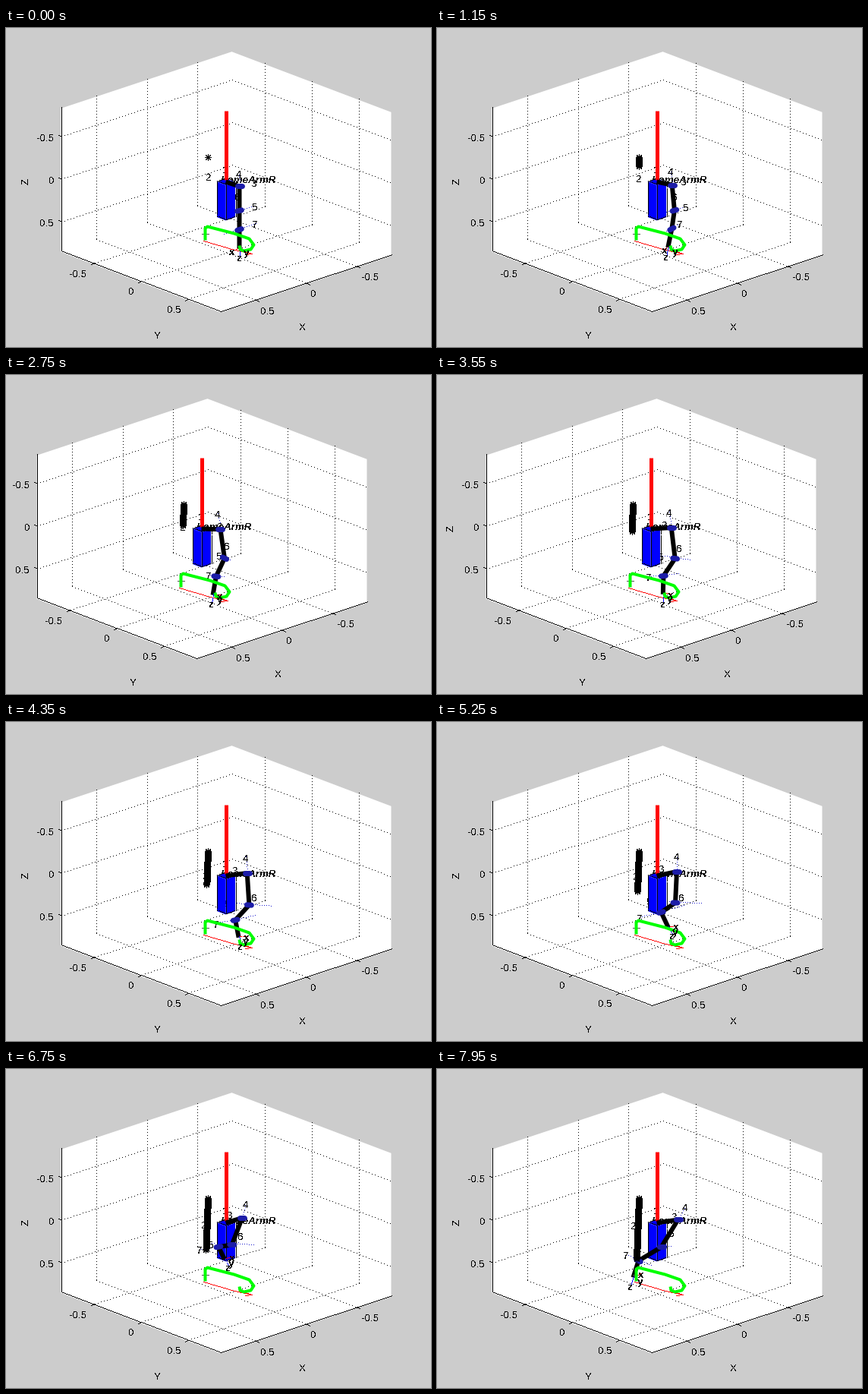
A matplotlib script that plays this animation: 560x420 px, repeating every 8 s.

```python
import numpy as np
import matplotlib.pyplot as plt
from matplotlib.animation import FuncAnimation

W, H, DPI = 560, 420, 100
PX = 72 / DPI  # points per pixel
FRAMES, INTERVAL = 160, 50
LAST_STEP = FRAMES // 2

plt.rcParams.update({
    "font.family": "Liberation Sans", "font.size": 13.33 * PX,
    "text.antialiased": False,
})

fig = plt.figure(figsize=(W / DPI, H / DPI), dpi=DPI, facecolor="#cccccc")
ax = fig.add_axes([0, 0, 1, 1])
ax.axis("off")
ax.set_ylim(H - 0.5, -0.5)

R = 0.842  # half the axis range
BASIS = np.array([[-112.5, 37.3], [105, 39.8], [0, 94.5]]) / R
ORIGIN = np.array([289.5, 202.3])


def project(*points):
    return ORIGIN + np.array(points) @ BASIS


def raster(points, gap=1):
    """Whole-pixel positions along a polyline, one in every `gap`."""
    points = np.asarray(points, float)
    parts = []
    for a, b in zip(points, points[1:]):
        count = int(np.abs(b - a).max()) + 1
        parts.append(np.linspace(a, b, count)[::gap])
    return np.floor(np.concatenate(parts) + 0.5).T


def thin(points, color="k", z=2, gap=1):
    x, y = raster(points, gap)
    return ax.plot(x, y, ",", color=color, zorder=z)[0]


def thick(points, color, width, z, cap="butt"):
    x, y = np.array(points, float).T
    return ax.plot(x, y, color=color, lw=width * PX, zorder=z,
                   solid_capstyle=cap, solid_joinstyle="round")[0]


def label(x, y, text, ha="center", z=3, **kw):
    """Place text with the middle of its capitals at y."""
    return ax.text(x, y + 4.8, text, ha=ha, va="baseline", zorder=z, **kw)


def face(points, color, z=1):
    ax.add_patch(plt.Polygon(points, closed=True, fc=color, ec="none",
                             zorder=z))


def draw_axes():
    face(project((-R, -R, -R), (R, -R, -R), (R, -R, R), (R, R, R),
                 (-R, R, R), (-R, R, -R)), "white")
    for t in (-0.5, 0, 0.5):
        thin(project((t, -R, -R), (t, -R, R), (t, R, R)), gap=4)
        thin(project((-R, t, -R), (-R, t, R), (R, t, R)), gap=4)
        thin(project((R, -R, t), (-R, -R, t), (-R, R, t)), gap=4)

        name = f"{t:g}"
        tx, ty, tz = project((t, R, R), (R, t, R), (R, -R, t))
        thin([tx, tx + (4, 2)])
        thin([ty, ty + (-4, 2)])
        thin([tz, tz + (-4, -2)])
        label(63, tz[1], name, "right")
        label(tx[0] + 7, tx[1] + 12.5, name, "left")
        label(ty[0] - 9, ty[1] + 12, name, "right")
    thin(project((R, -R, -R), (R, -R, R), (R, R, R), (-R, R, R)))
    label(390, 393, "X")
    label(199, 404, "Y")
    ax.text(26, 201, "Z", rotation=90, ha="center", va="center")


def draw_body():
    a, h = 0.0465, 0.413
    left, front, right, back = (a, -a), (a, a), (-a, a), (-a, -a)
    top = project(*[(*c, 0) for c in (left, front, right, back, left)])
    face(top, "#0000ff", z=5)
    thin(top, z=5)
    for c, d in ((left, front), (front, right)):
        side = project((*c, 0), (*d, 0), (*d, h), (*c, h), (*c, 0))
        face(side, "#0000ff", z=5)
        thin(side, z=5.1)
    thick([(289, 108.5), (289, 200)], "red", 5, 6)
    label(282, 199, "HomeArmR", "left", 4, weight="bold", style="italic")
    label(288, 186, "1")


def draw_path():
    thick([(262, 279), (262, 263), (265, 261), (300, 270), (320, 277),
           (326, 285), (322, 291), (313, 293), (308, 291), (307, 286)],
          "#00ff00", 4, 10)
    thin([(257, 272), (266, 272)], "#555555", 9)
    thin([(259, 281), (300, 293), (323, 298), (314, 299)], "red", 9)
    thin([(308, 293), (323, 298)], "red", 9)


def travel(u, start, end, swing=(0, 0), lift=(0, 0), arc=(0, 0)):
    """Straight drift from start to end with three smooth bends."""
    start, end, swing, lift, arc = map(np.array, (start, end, swing, lift, arc))
    return (start + (end - start) * u + swing * np.sin(2 * np.pi * u * u)
            + lift * np.sin(np.pi * u * u) + arc * np.sin(np.pi * u))


def arm_joints(u):
    return (
        travel(u, (307, 208), (317, 198), swing=(5, 0), lift=(0, -5)),
        travel(u, (307, 240), (295, 234), swing=(6, 4), arc=(14, 0)),
        travel(u, (307, 265), (265, 252), swing=(0, 12), lift=(0, -11),
               arc=(18, 0)),
        travel(u, (307, 290), (258, 274), swing=(0, 15), lift=(26, -15),
               arc=(5, 0)),
    )


def number_spots(u, shoulder, elbow, wrist):
    """Joint numbers sit at the ends of slowly turning joint axes."""
    arc, lift = np.sin(np.pi * u), np.sin(np.pi * u * u)
    turn = np.cos(4.5 * u)
    return {
        "2": np.array((267 - 8 * u, 196 + 10 * u)),
        "3": shoulder + (20 * turn, -4),
        "4": shoulder + (10 * u - 1 - 7 * arc, -16 - 4 * arc),
        "5": elbow + (27.5 * turn - 6.5, 5 * u - 5),
        "6": elbow + (16 * u - 2, 12 * lift ** 2 - 18),
        "7": wrist + (25 * np.cos(4.2 * u ** 0.8) - 4, 15 * lift - 7),
    }


def unit(v):
    return v / np.hypot(*v)


draw_axes()
draw_body()
draw_path()

blank = [(0, 0), (0, 0)]
arm = thick(blank, "k", 6, 7)
joints = [thick(blank, "#1c1ca8", 7, 8, "round") for _ in range(3)]
pivots = [thin(blank, "#2020d0", 3) for _ in range(3)]
tool_x = thin(blank, "red", 9)
tool_z = thin(blank, "blue", 9)
trail = ax.plot([], [], "k", ls="none", marker=(8, 2, 0), ms=9 * PX,
                mew=PX, zorder=8)[0]
numbers = {n: label(0, 0, n) for n in "234567"}
tool_names = {n: label(0, 0, n, z=11, weight="bold") for n in "xyz"}


def place(texts, spots):
    for name, (x, y) in spots.items():
        texts[name].set_position((x, y + 4.8))


def update(frame):
    step = (frame + 1) // 2
    u = step / LAST_STEP

    # The view jumps left once, then glides back
    shift = min(0, 3 * (step - 28) - 32) if step >= 28 else 0
    ax.set_xlim(-0.5 - shift, W - 0.5 - shift)

    shoulder, elbow, wrist, hand = arm_joints(u)
    spots = number_spots(u, shoulder, elbow, wrist)
    place(numbers, spots)
    arm.set_data(*np.array([(289, 202), shoulder, elbow, wrist, hand]).T)

    centres = (shoulder, elbow, wrist)
    axes = (np.array((1, 0)), unit(spots["5"] - elbow),
            unit(spots["7"] - wrist))
    for joint, centre, axis in zip(joints, centres, axes):
        joint.set_data(*np.array([centre - 3 * axis, centre + 3 * axis]).T)
    for pivot, centre, name in zip(pivots, centres, "457"):
        end = spots[name]
        pivot.set_data(*raster([2 * centre - end, end], 3))

    x_tip = hand + (10 * np.tanh(10 * u - 2), 4 - 8 * u)
    z_tip = hand + 12 * unit(hand - wrist)
    tool_x.set_data(*raster([hand, x_tip]))
    tool_z.set_data(*raster([hand, z_tip]))
    place(tool_names, {"x": x_tip, "y": hand + (9, 5), "z": z_tip})

    drops = np.arange(step + 1)
    trail.set_data(265.5 - 3 * drops / LAST_STEP, 170 + drops)
    return []


anim = FuncAnimation(fig, update, frames=FRAMES, interval=INTERVAL,
                     repeat=True, repeat_delay=0, blit=False)
plt.show()
```
